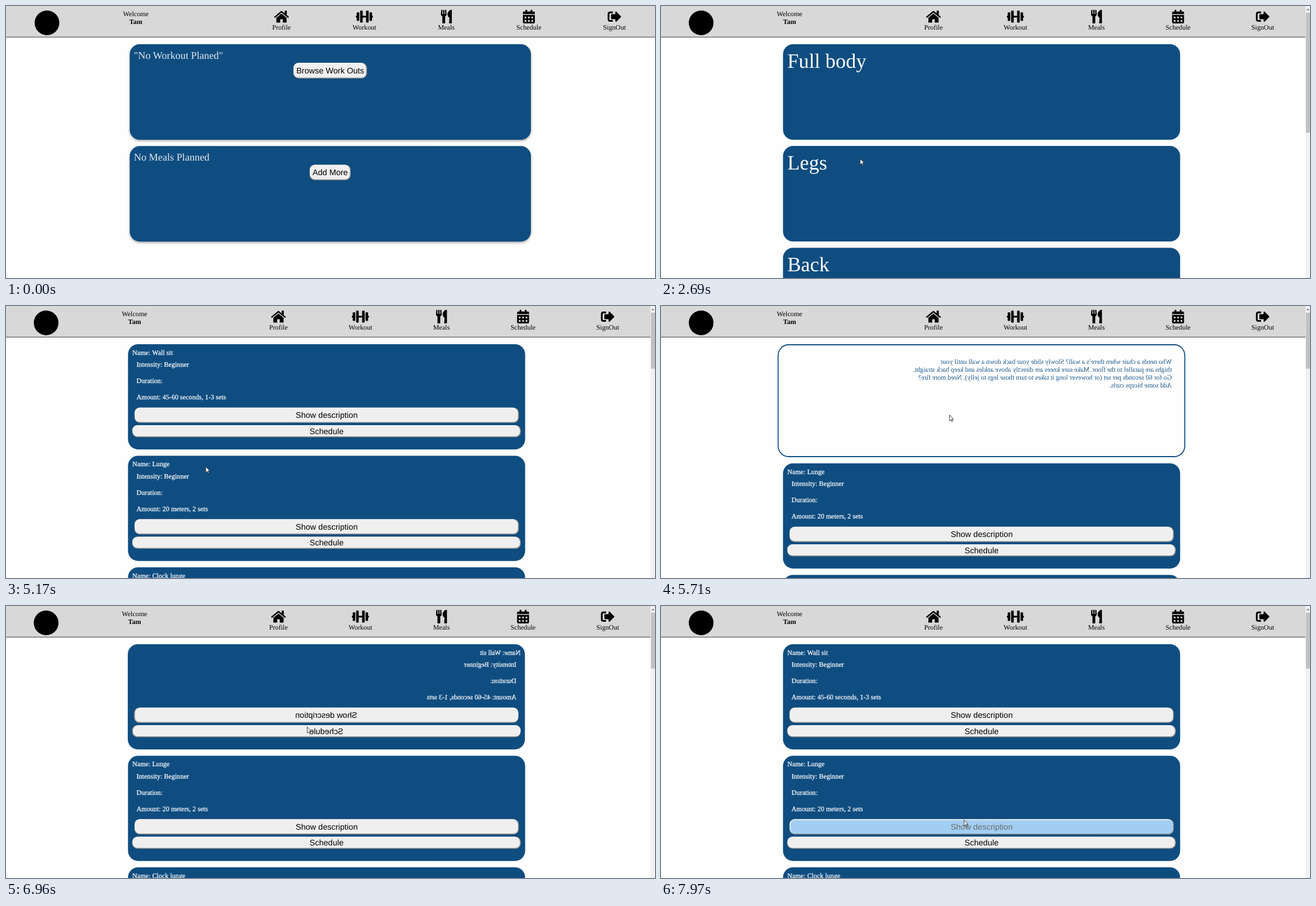
Animation, 1156 px wide and 484 px high, one loop 8000 ms. Source, as an HTML page:

```html
<!DOCTYPE html>
<html lang="en">
<head>
<meta charset="utf-8">
<title>Workout planner</title>
<style>
  html, body { margin: 0; width: 100%; height: 100%; overflow: hidden; background: #fefefe; }
  svg { display: block; }
  text { font-family: "Liberation Serif", Times, serif; text-rendering: geometricPrecision; white-space: pre; }
  .button { font-family: "Liberation Sans", Arial, sans-serif; }
  .raised { filter: drop-shadow(0 2px 2px rgba(0, 0, 0, .35)); }
  .strong { stroke: #fff; stroke-width: .25px; }
</style>
</head>
<body>
<svg id="stage" width="1156" height="484" viewBox="0 0 1156 484"></svg>
<script>
const LOOP = 8000;
const NAVY = '#0f4d80', BAR = '#d8d8d8';
const EM = 12.15;
const FACE = [239, 239, 239], HOVER = [56, 160, 248];
const stage = document.getElementById('stage');

// Moments of the story, in ms
const PRESS_BROWSE = 1620, OPEN_LIST = 1770, OPEN_LEGS = 4020;
const SHOW_BACK = 5560, SHOW_FRONT = 6900;
const FLIP_TO_BACK = 5633, FLIP_TO_FRONT = 6960, FLIP_TIME = 1000;
const HOVER_TIME = 300, CLICK = 6660, CLICK_TIME = 150;

// The pointer rests at each stop and arrives at the next one after a short trip
const TRIP = 300, POINTER_SHOWN = 290;
const STOPS = [
  { at: 0, x: 1100, y: 475 }, { at: 440, x: 659, y: 215 }, { at: 900, x: 578, y: 151 },
  { at: 1450, x: 570, y: 118 }, { at: 2230, x: 370, y: 197 }, { at: 2690, x: 354, y: 271 },
  { at: 3790, x: 355, y: 285 }, { at: 5560, x: 513, y: 193 }, { at: 6200, x: 540, y: 345 },
  { at: 6660, x: 536, y: 205 }, { at: 7210, x: 534, y: 261 }, { at: 7970, x: 539, y: 380 }
];

const clamp = v => Math.min(1, Math.max(0, v));
const mix = (a, b, k) => a + (b - a) * k;
const mixColor = (a, b, k) => `rgb(${a.map((v, i) => Math.round(mix(v, b[i], k)))})`;

// The CSS "ease" curve, solved by bisection
function ease(x) {
  const bezier = (s, p, q) => 3 * s * (1 - s) ** 2 * p + 3 * s * s * (1 - s) * q + s ** 3;
  let low = 0, high = 1;
  for (let i = 0; i < 24; i++) {
    const mid = (low + high) / 2;
    if (bezier(mid, .25, .25) < x) low = mid; else high = mid;
  }
  return bezier(low, .1, 1);
}

const progress = (t, start, length) => ease(clamp((t - start) / length));
const rect = (x, y, w, h, r = 0, fill = '#000', extra = '') =>
  `<rect x="${x}" y="${y}" width="${w}" height="${h}" rx="${r}" fill="${fill}" ${extra}/>`;
const line = (d, width, cap = 'butt') =>
  `<path d="${d}" fill="none" stroke="#000" stroke-width="${width}" stroke-linecap="${cap}" stroke-linejoin="round"/>`;
const text = (x, y, size, fill, content, extra = '') =>
  `<text x="${x}" y="${y}" font-size="${size}" fill="${fill}" ${extra}>${content}</text>`;
const centered = (x, y, size, fill, content, extra = '') =>
  text(x, y, size, fill, content, `text-anchor="middle" ${extra}`);

function button(x, y, w, h, label, hover = 0, pressed = false) {
  const border = ['#8c8c8c', '#f1f1f1'];
  if (pressed) border.reverse();
  return rect(x, y, w, h, 9, border[0])
    + rect(x, y, w - 1.7, h - 1.7, 9, border[1])
    + rect(x + 1.7, y + 1.7, w - 3.4, h - 3.4, 7.5, mixColor(FACE, HOVER, hover))
    + (pressed ? rect(x, y, w, h, 0, 'none', 'stroke="#e8eef4"') : '')
    + centered(x + w / 2, y + h / 2 + 5, 14.5, mixColor([0, 0, 0], [255, 255, 255], hover), label, 'class="button"');
}

// Icons are drawn on a grid 512 units high
const ICON_SCALE = 2 * EM / 512;
const repeat = (items, draw) => items.map(draw).join('');
const ICONS = {
  Profile: { width: 576, art:
    line('M25 284L288 68 551 284', 54) + rect(408, 32, 80, 155, 12)
    + '<path d="M288 142L96 300V480H240V352h96V480H480V300z"/>' },
  Workout: { width: 640, art:
    repeat([1, -1], side => `<g transform="translate(320) scale(${side} 1)">`
      + rect(64, 32, 96, 448, 24) + rect(192, 96, 96, 320, 24) + rect(270, 224, 50, 64, 8) + '</g>')
    + rect(250, 224, 140, 64) },
  Meals: { width: 416, art:
    line('M40 24L30 150M112 24V160M184 24L194 150', 48, 'round')
    + '<path d="M4 150H220Q220 230 155 249H69Q4 230 4 150z"/>' + rect(60, 230, 104, 282, 24)
    + '<path d="M327 301C170 178 310 0 392 0q24 0 24 24V488q0 24-24 24H336q-24 0-24-26z"/>' },
  Schedule: { width: 448, art:
    rect(0, 64, 448, 448, 48) + rect(0, 160, 448, 32, 0, BAR)
    + repeat([96, 288], x => rect(x, 0, 64, 90, 16))
    + repeat([64, 192, 320], x => repeat([256, 384], y => rect(x, y, 64, 64, 12, BAR))) },
  SignOut: { width: 512, art:
    line('M192 416H96q-64 0-64-64V160q0-64 64-64h96', 64)
    + '<path d="M312 88L480 256 312 424V328H152V184H312z" stroke="#000" stroke-width="48" stroke-linejoin="round"/>' }
};

const ruler = document.createElement('canvas').getContext('2d');
ruler.font = `${EM}px "Liberation Serif", Times, serif`;

// The menu is spaced evenly and tightens a little when the scrollbar takes room
function header(tight) {
  const width = 1156 - 8 * tight, gap = 110 - 1.65 * tight;
  let left = 474.2 - 5.4 * tight;
  const items = repeat(Object.entries(ICONS), ([label, icon]) => {
    const labelWidth = ruler.measureText(label).width;
    const x = left + labelWidth / 2;
    left += labelWidth + gap;
    return `<g transform="translate(${x - icon.width * ICON_SCALE / 2} 6.8) scale(${ICON_SCALE})">${icon.art}</g>`
      + centered(x, 42, EM, '#000', label);
  });
  const welcomeX = 231.3 - 2.3 * tight;
  return rect(0, 0, width, 55, 0, BAR) + rect(0, 54.6, width, 1.6, 0, '#777')
    + `<circle cx="${73 - 1.5 * tight}" cy="30" r="22"/>`
    + centered(welcomeX, 18, EM, '#000', 'Welcome')
    + centered(welcomeX, 32, EM, '#000', 'Tam', 'font-weight="bold"')
    + items;
}

function homePage(t) {
  const card = (y, title) => rect(220.4, y, 714.6, 170, 18, NAVY, 'class="raised"')
    + text(227.8, y + 26, EM * 1.5, '#e2e9f0', title);
  return header(0)
    + card(68, '"No Workout Planed"')
    + button(512, 101, 131, 28, 'Browse Work Outs', progress(t, 1320, HOVER_TIME), t >= PRESS_BROWSE)
    + card(249.2, 'No Meals Planned')
    + button(541, 282.4, 73, 27.6, 'Add More');
}

const listCard = (y, height) => rect(217.3, y, 707.4, height, 18, NAVY);

const categories = () => repeat(['Full body', 'Legs', 'Back'], (name, i) => {
  const y = 68 + i * 181.1;
  return listCard(y, 170) + text(225, y + 42, EM * 3, '#fff', name);
});

function exercise(y, name, amount, hover = 0) {
  const details = ['Intensity: Beginner', 'Duration:', 'Amount: ' + amount];
  const label = (x, dy, content) => text(x, y + dy, EM, '#fff', content, 'class="strong"');
  return listCard(y, 187.2)
    + label(225, 18.5, 'Name: ' + name)
    + repeat(details, (content, i) => label(232.5, 40 + i * 29.2, content))
    + button(229, y + 112.8, 684.5, 27.2, 'Show description', hover)
    + button(225, y + 144, 692, 21.5, 'Schedule');
}

function description() {
  const lines = [
    'Who needs a chair when there’s a wall? Slowly slide your back down a wall until your',
    'thighs are parallel to the floor. Make sure knees are directly above ankles and keep back straight.',
    'Go for 60 seconds per set (or however long it takes to turn those legs to jelly). Need more fire?',
    'Add some biceps curls.'
  ];
  return rect(201.2, 69, 739.2, 199, 19, '#fefefe', `stroke="${NAVY}" stroke-width="1.8"`)
    + repeat(lines, (content, i) => text(225, 103.4 + i * 14, EM, '#1a5688', content));
}

function legs(t) {
  const backShown = t >= SHOW_BACK && t < SHOW_FRONT;
  const turn = t < SHOW_BACK ? 1 : progress(t, backShown ? FLIP_TO_BACK : FLIP_TO_FRONT, FLIP_TIME);
  const hover = t < SHOW_BACK ? progress(t, 5480, HOVER_TIME) : 0;
  const face = backShown ? description() : exercise(68, 'Wall sit', '45-60 seconds, 1-3 sets', hover);
  const next = backShown ? 280 : 266.5;
  return `<g transform="translate(570.8) scale(${-Math.cos(Math.PI * turn)} 1) translate(-570.8)">${face}</g>`
    + exercise(next, 'Lunge', '20 meters, 2 sets', progress(t, 7895, HOVER_TIME))
    + exercise(next + 198.5, 'Clock lunge', '20 meters, 2 sets');
}

const scrollbar = thumbHeight => rect(1148, 0, 8, 484, 0, '#f1f1f1')
  + '<path d="M1149.8 7.5l2.5-3 2.5 3z" fill="#777"/>'
  + rect(1148.8, 12, 7.2, thumbHeight, 0, '#c1c1c1');

function pointer(t) {
  if (t < POINTER_SHOWN) return '';
  const next = STOPS.findIndex(stop => stop.at > t);
  const to = STOPS.at(next), from = next > 0 ? STOPS[next - 1] : to;
  const k = clamp(1 - (to.at - t) / TRIP);
  const click = t >= CLICK && t < CLICK + CLICK_TIME ? '<circle r="9.5" fill="#ff0" fill-opacity=".5"/>' : '';
  return `<g transform="translate(${mix(from.x, to.x, k)} ${mix(from.y, to.y, k)})">${click}
    <path d="M.8.8V11.300l2.500-2.200 1.700 3.700 1.600-.7-1.600-3.600H8z" fill="#fff" stroke="#222" stroke-width=".9"/></g>`;
}

function render(t) {
  const inLegs = t >= OPEN_LEGS;
  const page = t < OPEN_LIST ? homePage(t)
    : (inLegs ? legs(t) : categories()) + header(1) + scrollbar(inLegs ? 99.5 : 213.5);
  stage.innerHTML = page + pointer(t);
}

const start = performance.now();
function frame() {
  render((performance.now() - start) % LOOP);
  requestAnimationFrame(frame);
}
frame();
</script>
</body>
</html>
```
